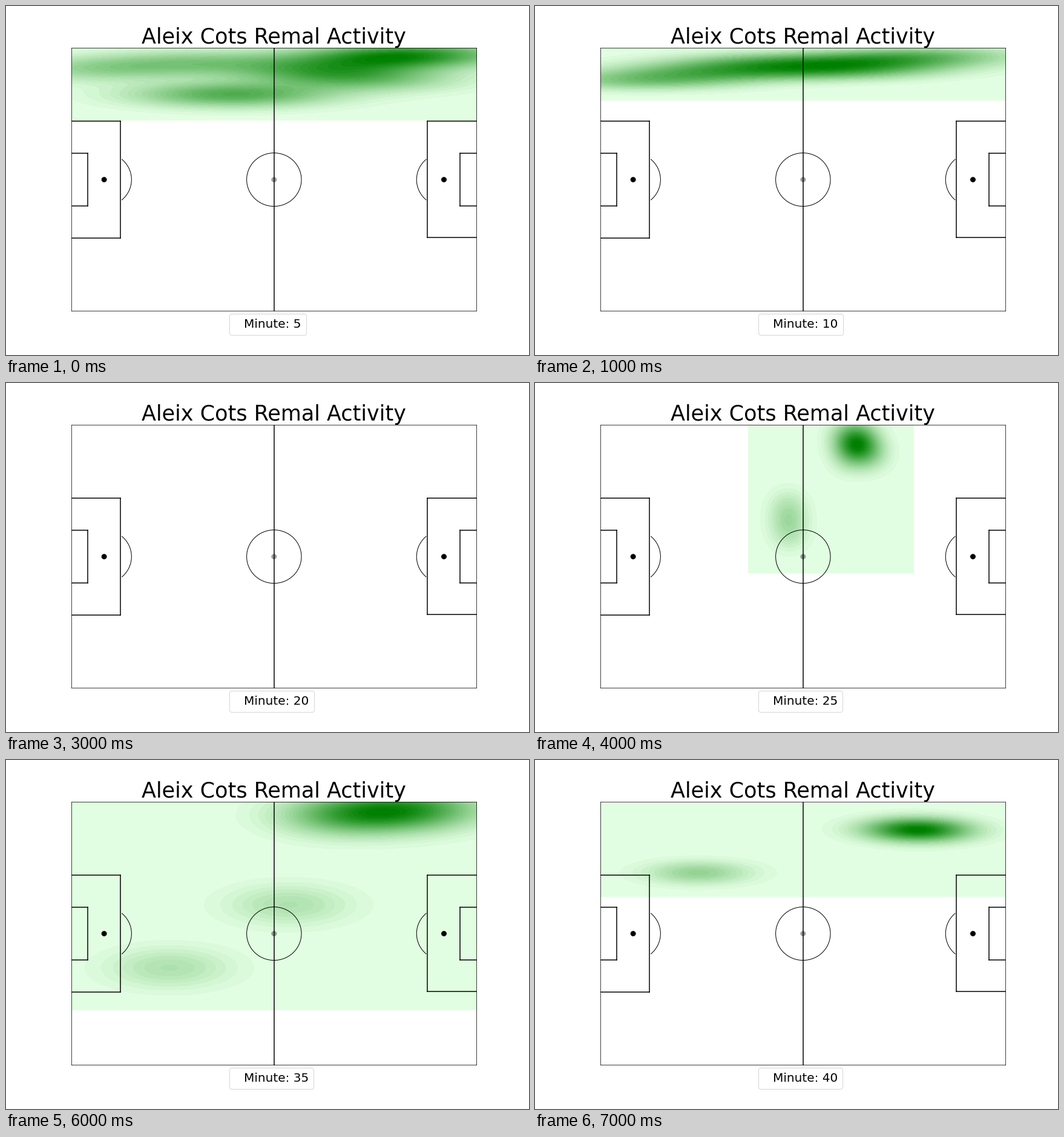
A matplotlib script for the animation above (8 s loop, 864 by 576 pixels).

```python
import numpy as np
import matplotlib.pyplot as plt
from matplotlib.animation import FuncAnimation
from matplotlib.colors import LinearSegmentedColormap
from matplotlib.lines import Line2D
from matplotlib.patches import Arc, Circle

LEFT, RIGHT, TOP, BOTTOM = 108, 777.6, 69.12, 504  # pitch edges in pixels
LENGTH, WIDTH = 120, 80
BANDS = 30
GREENS = LinearSegmentedColormap.from_list("greens", ["#e2fee2", "#008000"])


def run(start, end, count=1):
    """Evenly spaced touches along a line."""
    return np.linspace(start, end, count)


# Touches in each five minutes, in pixels.
ACTIVITY = [
    [run((120, 106), (360, 90), 4), run((310, 146), (440, 146), 4),
     run((480, 102), (620, 124), 5), run((580, 88), (720, 78), 6)],
    [run((180, 125), (400, 90), 4), run((480, 110), (640, 80), 4)],
    [run((359, 78), (372, 80), 2), run((450, 90), (500, 105), 4),
     run((680, 126), (696, 128), 2)],
    [],
    [run((510, 86), (560, 118), 7), run((518, 122), (540, 84), 5),
     run((418, 200), (420, 252), 4)],
    [run((200, 178), (400, 154), 8), run((520, 150), (680, 144), 4),
     run((600, 191), (690, 187), 2)],
    [run((530, 92), (715, 80), 6), run((467, 239), (467, 239)),
     run((270, 343), (270, 343))],
    [run((622, 111), (642, 119.5), 3), run((270, 186), (270, 186))],
]


def bandwidth(values):
    """Scott's rule with the robust spread."""
    q1, q3 = np.percentile(values, [25, 75])
    spread = min(values.std(ddof=1), (q3 - q1) / 1.349)
    return 1.059 * spread * len(values) ** -0.2


def kernel(values, low, high):
    """Grid within three bandwidths, and each touch's weight on it."""
    bw = bandwidth(values)
    grid = np.linspace(max(values.min() - 3 * bw, low),
                       min(values.max() + 3 * bw, high), 100)
    return grid, np.exp(-0.5 * ((grid[:, None] - values) / bw) ** 2)


def draw_heat(ax, runs):
    xs, ys = np.concatenate(runs).T
    gx, kx = kernel(xs, LEFT, RIGHT)
    gy, ky = kernel(ys, TOP, BOTTOM)
    density = ky @ kx.T
    density /= density.max() * 1.0001
    half = 0.5 / BANDS
    return ax.contourf((gx - LEFT) / (RIGHT - LEFT) * LENGTH,
                       (BOTTOM - gy) / (BOTTOM - TOP) * WIDTH, density,
                       levels=np.linspace(0, 1, BANDS + 1), cmap=GREENS,
                       vmin=half, vmax=1 - half, zorder=0)


def draw_pitch(ax):
    def line(*points):
        for (x0, y0), (x1, y1) in zip(points, points[1:]):
            ax.plot([x0, x1], [y0, y1], color="black", lw=1.5)

    line((0, 0), (0, 80), (120, 80), (120, 0), (0, 0))
    line((60, 0), (60, 80))
    line((0, 57.8), (14.6, 57.8), (14.6, 22.2), (0, 22.2))
    line((120, 57.8), (105.4, 57.8), (105.4, 22.5), (120, 22.5))
    line((0, 48), (4.9, 48), (4.9, 32), (0, 32))
    line((120, 48), (115.1, 48), (115.1, 32), (120, 32))
    ax.add_patch(Circle((60, 40), 8.1, fill=False, color="black"))
    ax.add_patch(Circle((60, 40), 0.8, color="black", alpha=0.4, lw=0))
    for x, start, end in ((9.7, 310, 50), (110.3, 130, 230)):
        ax.add_patch(Circle((x, 40), 0.71, color="black"))
        ax.add_patch(Arc((x, 40), 16.2, 16.2, theta1=start, theta2=end,
                         color="black"))


plt.rcParams["font.family"] = "DejaVu Sans"
fig = plt.figure(figsize=(12, 8), dpi=72, facecolor="white")
fig.subplots_adjust(left=0.125, right=0.9, top=0.88, bottom=0.125)
ax = fig.add_subplot()
ax.axis("off")
draw_pitch(ax)
ax.set_title("Aleix Cots Remal Activity", fontsize=35)
heat = []


def update(frame):
    while heat:
        heat.pop().remove()
    if ACTIVITY[frame]:
        heat.append(draw_heat(ax, ACTIVITY[frame]))
    ax.set(xlim=(0, LENGTH), ylim=(0, WIDTH))
    ax.legend(handles=[Line2D([], [], ls="none")],
              labels=[f"Minute: {5 * (frame + 1)}"],
              loc=(0.39, -0.09), fontsize=20, handlelength=0)
    return []


anim = FuncAnimation(fig, update, frames=len(ACTIVITY), interval=1000,
                     init_func=lambda: [], repeat=True, blit=False)
plt.show()
```
